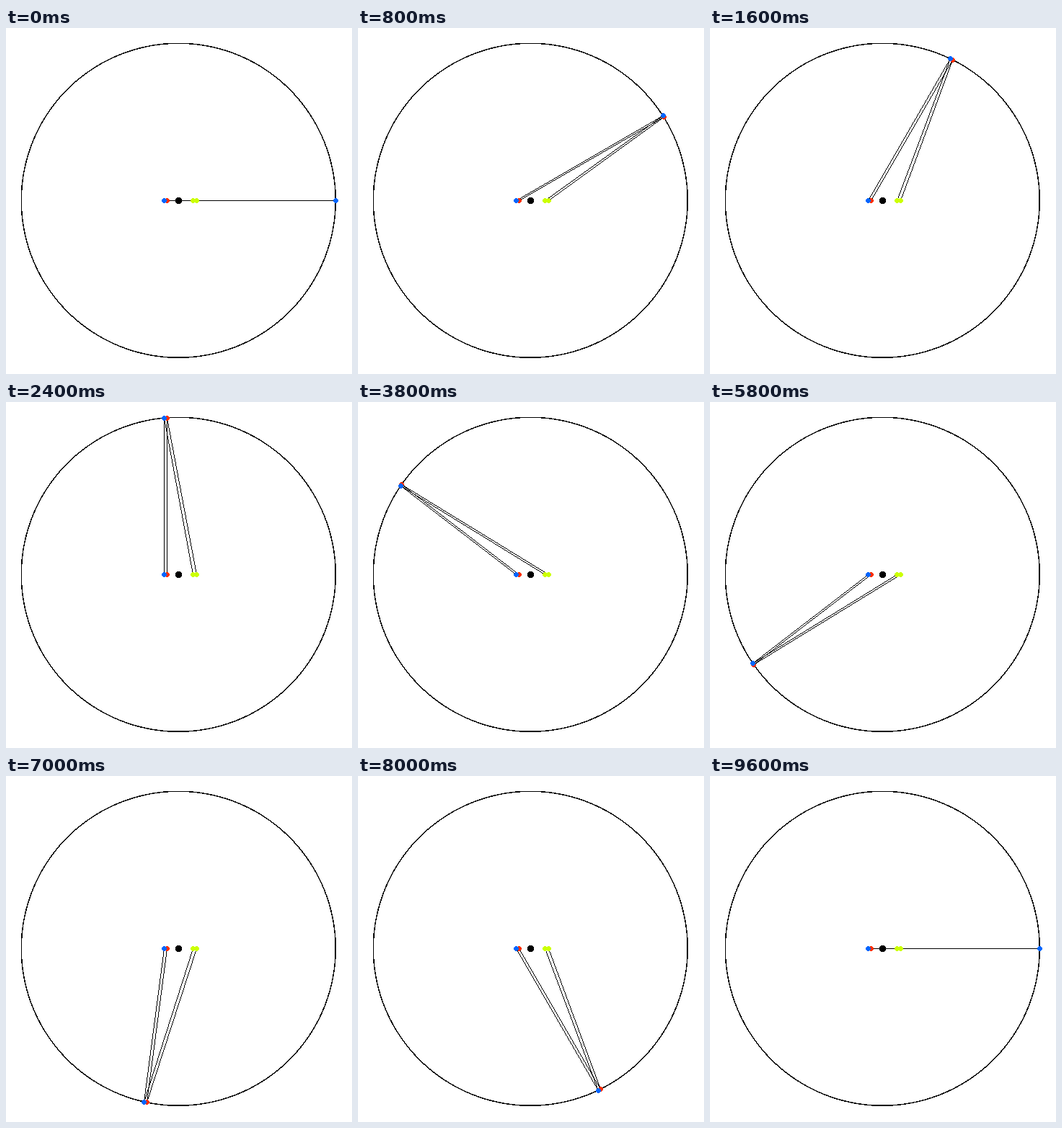
Write a matplotlib script that moves like this. It is 480x480 px and loops after 9800 ms.

```python
import numpy as np
import matplotlib.pyplot as plt
from matplotlib.animation import FuncAnimation

SIZE, DPI = 480, 80
STEPS = 48
CENTER, RADIUS = 239, 218
WHITE, BLACK = (255, 255, 255), (0, 0, 0)
RED, BLUE, LIME = (255, 46, 0), (0, 102, 255), (204, 255, 0)

# Offsets from the centre: (ray origin, second anchor, colour)
PAIRS = [(-16, 25, RED), (-20, 20, BLUE)]

ROWS, COLS = np.mgrid[:SIZE, :SIZE]


def distance(x, y):
    return np.hypot(COLS - x, ROWS - y)


def dot(image, x, y, color, radius=3.5):
    image[distance(x, y) <= radius] = color


def segment(image, start, end):
    """One-pixel line without smoothing."""
    count = max(abs(end[0] - start[0]), abs(end[1] - start[1])) + 1
    xs = np.rint(np.linspace(start[0], end[0], count)).astype(int)
    ys = np.rint(np.linspace(start[1], end[1], count)).astype(int)
    image[ys, xs] = BLACK


def rim_point(origin, angle):
    """Pixel where a ray from the origin meets the circle."""
    c, s = np.cos(angle), np.sin(angle)
    reach = -origin * c + np.sqrt(RADIUS**2 - (origin * s) ** 2)
    x, y = origin + reach * c, reach * s
    return int(np.rint(CENTER + x)), int(np.rint(CENTER - y))


background = np.full((SIZE, SIZE, 3), WHITE, dtype=np.uint8)
rim = CENTER - 0.25
background[np.abs(distance(rim, rim) - RADIUS) <= 0.75] = BLACK


def paint(step):
    image = background.copy()
    angle = 2 * np.pi * step / STEPS
    tips = [rim_point(origin, angle) for origin, _, _ in PAIRS]
    for (origin, anchor, _), tip in zip(PAIRS, tips):
        segment(image, (CENTER + origin, CENTER), tip)
        segment(image, (CENTER + anchor, CENTER), tip)
    dot(image, CENTER, CENTER, BLACK, 4.5)
    for (origin, anchor, color), tip in zip(PAIRS, tips):
        dot(image, CENTER + origin, CENTER, color)
        dot(image, CENTER + anchor, CENTER, LIME)
        dot(image, *tip, color)
    return image


fig = plt.figure(figsize=(SIZE / DPI, SIZE / DPI), dpi=DPI, facecolor="white")
ax = fig.add_axes([0, 0, 1, 1])
ax.axis("off")
canvas = ax.imshow(paint(0), interpolation="nearest", aspect="auto",
                   extent=(0, SIZE, SIZE, 0))


def update(step):
    canvas.set_data(paint(step))
    return [canvas]


anim = FuncAnimation(fig, update, frames=STEPS + 1, interval=200,
                     repeat=True, repeat_delay=0)
plt.show()
```
